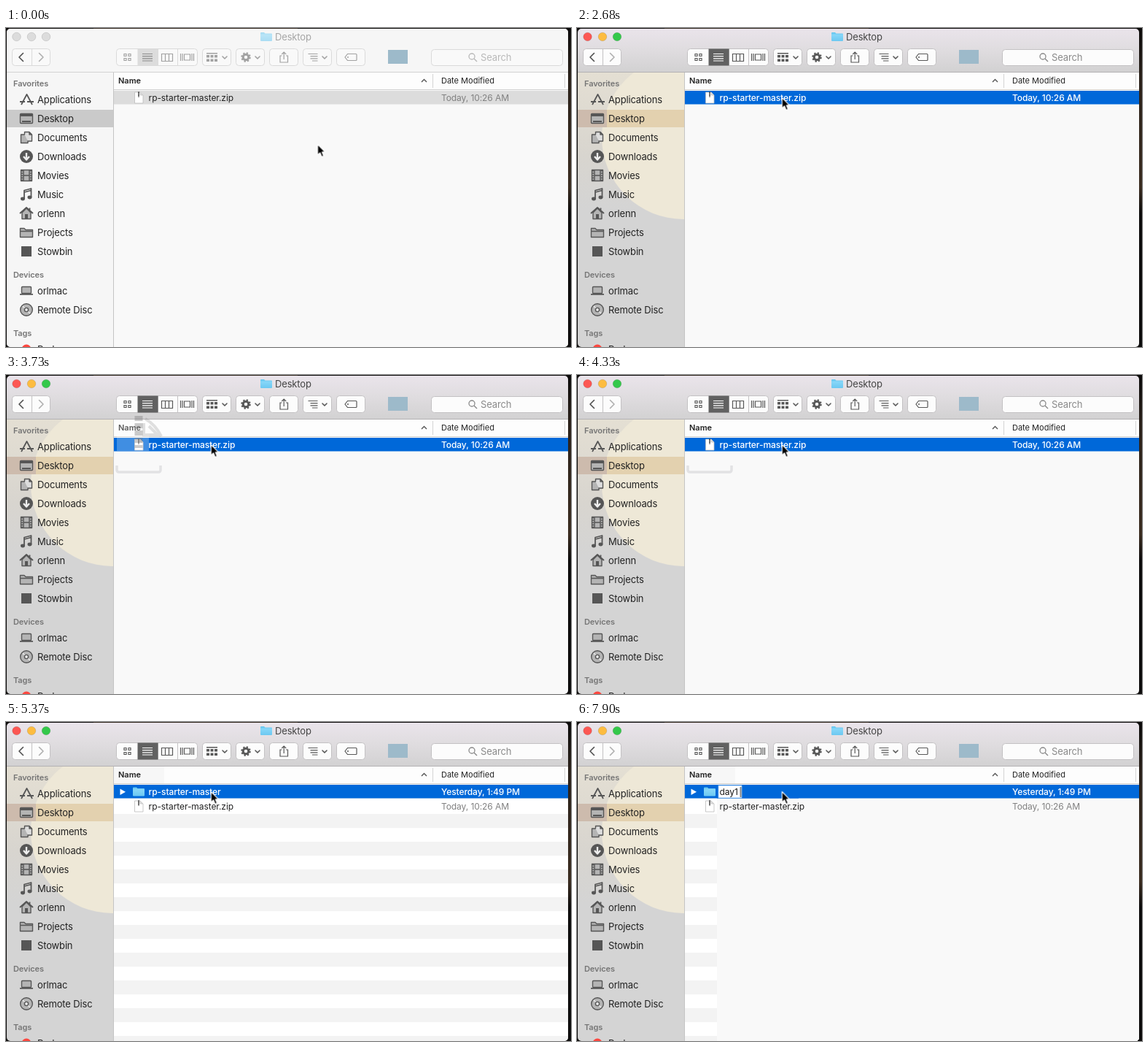
Animation, 775 px wide and 437 px high, one loop 8 s. Source, as an HTML page:

```html
<!DOCTYPE html>
<html lang="en">
<head>
<meta charset="utf-8">
<title>Renaming an unpacked folder</title>
<style>
html, body { margin: 0; width: 100%; height: 100%; overflow: hidden; background: #0d0c0b; }
svg { display: block; width: 775px; height: 437px; }
text { font: 400 13px Inter, "Open Sans", sans-serif; letter-spacing: -.15px; fill: #222; white-space: pre; }

/* Window themes, inherited by the <use> copies */
.live {
  --bar: url(#bar); --line: #b3b1b3; --side: url(#side); --tint: 1; --pick: #e3d1af; --pickLeft: #cdbbad;
  --ink: #585858; --btn: #fcfcfc; --edge: #c3c1c3; --on: #616161; --onInk: #fff; --title: #444; --hint: #8a8a8a;
  --red: #fc5753; --yellow: #fdbc40; --green: #34c84a; --fade: 1;
}
.idle {
  --bar: #f6f6f6; --line: #d2d2d2; --side: #f6f6f6; --tint: 0; --pick: #cacaca; --pickLeft: #cacaca;
  --ink: #a2a2a2; --btn: #f9f9f9; --edge: #dadada; --on: #dcdcdc; --onInk: #8c8c8c; --title: #a6a6a6; --hint: #b9b9b9;
  --red: #dcdcdc; --yellow: #dcdcdc; --green: #dcdcdc; --fade: .55;
}
/* Row themes */
.sel { --row: #0068d9; --name: #fff; --date: #fff; --arrow: #fff; --w: 500; }
.dim { --row: #dcdcdc; --name: #222; --date: #808080; --arrow: #777; --w: 400; }
.plain { --row: transparent; --name: #222; --date: #808080; --arrow: #777; --w: 400; }

.btn { fill: var(--btn); stroke: var(--edge); }
.ink { fill: none; stroke: var(--ink); stroke-width: 1.2; }
.inkFill { fill: var(--ink); }
.chev { fill: none; stroke: var(--ink); stroke-width: 1.6; stroke-linecap: round; stroke-linejoin: round; }
.side text.h { font-size: 11px; font-weight: 600; letter-spacing: -.1px; fill: #757575; }
.glyph { fill: none; stroke: #565656; stroke-width: 1.4; stroke-linejoin: round; }
.glyph .g { fill: #b4b4b4; }
.glyph .s { fill: #565656; stroke: none; }
.col { font-size: 11px; letter-spacing: 0; }
.row rect.bg { fill: var(--row); }
.row text, .edit text { font-size: 12px; letter-spacing: -.08px; }
.row .name { fill: var(--name); font-weight: var(--w); }
.row .date { fill: var(--date); font-weight: var(--w); }

/* Timing: every change is a hard cut */
.t { animation: 8s step-end infinite; opacity: 0; }
#idle { animation-name: idle; }
#ghost { animation-name: ghost; }
#tray { animation-name: tray; }
#list { animation-name: list; }
#folderOn { animation-name: folderOn; }
#zipOn { animation-name: zipOn; }
.flat { animation-name: edit; }
#picked { animation-name: picked; }
#typed { animation-name: typed; }
#field { animation: field 8s step-end infinite; }
#caret { animation: caret 8s step-end infinite; }
#typed .c { fill: transparent; animation: 8s step-end infinite; }
#typed .c2 { animation-name: c2; }
#typed .c3 { animation-name: c3; }
#typed .c4 { animation-name: c4; }
#arrow { animation: move 8s step-end infinite; }
#beam { animation-name: beam; }

@keyframes idle { 0% { opacity: 1 } 16.875% { opacity: 0 } 42.875% { opacity: 1 } 46.625% { opacity: 0 } }
@keyframes ghost { 0% { opacity: 0 } 46.625% { opacity: 1 } 48.5% { opacity: 0 } }
@keyframes tray { 0% { opacity: 0 } 46.625% { opacity: 1 } 56% { opacity: 0 } }
@keyframes list { 0% { opacity: 0 } 56%, 100% { opacity: 1 } }
@keyframes folderOn { 0% { opacity: 0 } 56% { opacity: 1 } 57.875% { opacity: 0 } 67.125%, 100% { opacity: 1 } }
@keyframes zipOn { 0% { opacity: 0 } 57.875% { opacity: 1 } 67.125% { opacity: 0 } }
@keyframes edit { 0% { opacity: 0 } 85.875%, 100% { opacity: 1 } }
@keyframes picked { 0% { opacity: 0 } 85.875% { opacity: 1 } 93.25% { opacity: 0 } }
@keyframes typed { 0% { opacity: 0 } 93.25%, 100% { opacity: 1 } }
@keyframes field { 0% { width: 105px } 93.25% { width: 14px } 95.125% { width: 20px } 96.875% { width: 26px } 98.75%, 100% { width: 32px } }
@keyframes caret { 0% { transform: translateX(204.5px) } 95.125% { transform: translateX(211.5px) } 96.875% { transform: translateX(218px) } 98.75%, 100% { transform: translateX(224.5px) } }
@keyframes c2 { 0% { fill: transparent } 95.125%, 100% { fill: #111 } }
@keyframes c3 { 0% { fill: transparent } 96.875%, 100% { fill: #111 } }
@keyframes c4 { 0% { fill: transparent } 98.75%, 100% { fill: #111 } }
@keyframes beam { 0% { opacity: 0 } 84% { opacity: 1 } 93.25% { opacity: 0 } }
@keyframes move {
  0% { transform: translate(427.5px, 159.5px); opacity: 1 }
  22.5% { transform: translate(399.5px, 145px); opacity: 1 }
  24.375% { transform: translate(342.5px, 111px); opacity: 1 }
  26.25% { transform: translate(333.5px, 110px); opacity: 1 }
  28.125% { transform: translate(325.5px, 109px); opacity: 1 }
  29.875% { transform: translate(303.5px, 98.5px); opacity: 1 }
  31.75% { transform: translate(284.5px, 95.5px); opacity: 1 }
  33.5% { transform: translate(281.3px, 95.5px); opacity: 1 }
  84% { transform: translate(281.3px, 95.5px); opacity: 0 }
  93.25%, 100% { transform: translate(281.3px, 95.5px); opacity: 1 }
}
</style>
</head>
<body>
<svg viewBox="0 0 775 437">
<defs>
  <linearGradient id="bar" x2="0" y2="1"><stop stop-color="#eae4eb"/><stop offset=".45" stop-color="#e0dde0"/><stop offset="1" stop-color="#d2d1d2"/></linearGradient>
  <linearGradient id="side" x2="0" y2="1"><stop stop-color="#e4dfd3"/><stop offset=".3" stop-color="#d8d5cf"/><stop offset=".5" stop-color="#d4d4d4"/></linearGradient>
  <linearGradient id="desk" x2="0" y2="1"><stop stop-color="#0b0a0a"/><stop offset=".15" stop-color="#2a211a"/><stop offset=".5" stop-color="#3a2c20"/><stop offset=".58" stop-color="#0d0c0c"/></linearGradient>
  <linearGradient id="folderFill" x2="0" y2="1"><stop stop-color="#5fc3ee"/><stop offset=".3" stop-color="#86d6f8"/><stop offset="1" stop-color="#6cc8f1"/></linearGradient>
  <clipPath id="frame"><rect x="1" y="1" width="770" height="436" rx="5"/></clipPath>
  <clipPath id="sideClip"><rect x="1" y="61" width="146" height="376"/></clipPath>
  <pattern id="stripes" y="126" width="775" height="38" patternUnits="userSpaceOnUse"><rect width="775" height="19.2" fill="#f3f3f3"/></pattern>

  <path id="folder" d="M0 1.5Q0 .5 1 .5H5L6.5 2H15Q16 2 16 3V11.5Q16 12.5 15 12.5H1Q0 12.5 0 11.5Z" fill="url(#folderFill)"/>
  <path id="down" class="chev" d="M-3-1.5 0 1.5 3-1.5"/>

  <g id="zip">
    <path d="M.5.5H8L12 4.5V15.5H.5Z" fill="#fff" stroke="#bbb" stroke-width=".8"/>
    <path d="M8 .5V4.5H12" fill="#ddd" stroke="#b5b5b5" stroke-width=".6"/>
    <path d="M6 0V7" stroke="#444" stroke-width="2" stroke-dasharray="1.6 .5"/>
  </g>

  <g id="zipRow" class="row">
    <rect class="bg" x="148" y="86" width="623" height="18.5"/>
    <use href="#zip" x="176" y="87.500"/>
    <text class="name" x="195.500" y="100">rp-starter-master.zip</text>
    <text class="date" x="597" y="100">Today, 10:26 AM</text>
  </g>
  <g id="folderRow" class="row">
    <rect class="bg" x="148" y="86" width="623" height="18.5"/>
    <path d="M156.500 91.500V100L164 95.700Z" style="fill:var(--arrow)"/>
    <use href="#folder" x="174" y="89"/>
    <text class="name" x="195.500" y="100">rp-starter-master</text>
    <text class="date" x="597" y="100">Yesterday, 1:49 PM</text>
  </g>

  <g id="toolbar">
    <rect x="1" y="1" width="770" height="60" style="fill:var(--bar)"/>
    <path d="M1 60.500H771" style="stroke:var(--line)"/>
    <g stroke="#000" stroke-opacity=".12">
      <circle cx="14.500" cy="12" r="5.800" style="fill:var(--red)"/>
      <circle cx="35" cy="12" r="5.800" style="fill:var(--yellow)"/>
      <circle cx="55" cy="12" r="5.800" style="fill:var(--green)"/>
    </g>
    <use href="#folder" x="349" y="5.500" style="opacity:var(--fade)"/>
    <text x="369" y="17" style="fill:var(--title)">Desktop</text>

    <g class="btn">
      <rect x="8.500" y="28.500" width="52" height="23" rx="4"/>
      <rect x="151.500" y="28.500" width="111" height="23" rx="4"/>
      <rect x="269.500" y="28.500" width="39" height="23" rx="4"/>
      <rect x="315.500" y="28.500" width="39" height="23" rx="4"/>
      <rect x="361.500" y="28.500" width="39" height="23" rx="4"/>
      <rect x="407.500" y="28.500" width="39" height="23" rx="4"/>
      <rect x="453.500" y="28.500" width="39" height="23" rx="4"/>
      <rect x="583.500" y="29.500" width="180" height="22" rx="4"/>
      <path d="M35.500 29V51M208.500 29V51M235.500 29V51"/>
    </g>
    <path class="chev" d="M23.500 34.500 18 40 23.500 45.500" style="stroke:#505050"/>
    <path class="chev" d="M45.500 34.500 51 40 45.500 45.500" style="stroke:#b0b0b0"/>
    <g class="ink">
      <path d="M162 35.500h3v3h-3zM168 35.500h3v3h-3zM162 41.500h3v3h-3zM168 41.500h3v3h-3z"/>
      <path d="M213.500 35.500h15v10h-15zM218.500 35.500v10M223.500 35.500v10"/>
      <path d="M244.500 36h8v8h-8zM239.500 35v10M242 35v10M255 35v10M257.500 35v10"/>
    </g>
    <rect x="180.500" y="28.500" width="28" height="23" style="fill:var(--on)"/>
    <path d="M187 35.500h14M187 38.700h14M187 41.900h14M187 45h14" style="stroke:var(--onInk)" stroke-width="1.200"/>
    <path class="inkFill" d="M275 34h15v1.500h-15zM275 37h4v3.500h-4zM280.500 37h4v3.500h-4zM286 37h4v3.500h-4zM275 42.500h4v3.500h-4zM280.500 42.500h4v3.500h-4zM286 42.500h4v3.500h-4z"/>
    <circle class="ink" cx="329" cy="40" r="3.800" style="stroke-width:3"/>
    <circle class="ink" cx="329" cy="40" r="5.600" style="stroke-width:2.4;stroke-dasharray:2.2 2.2"/>
    <path class="ink" d="M378.500 38H376V47H386.500V38H384M381.200 43V33M378.200 36 381.200 33 384.200 36"/>
    <path class="ink" d="M414.500 35.500h13M417.500 38.700h10M417.500 41.900h10M420 45h7.500"/>
    <path class="ink" d="M465 40 468.500 35.500H480Q481 35.500 481 36.500V43.500Q481 44.500 480 44.500H468.500Z"/>
    <circle class="inkFill" cx="469" cy="40" r="1"/>
    <use href="#down" x="300" y="40.500"/><use href="#down" x="345" y="40.500"/><use href="#down" x="437" y="40.500"/>
    <rect x="524" y="30" width="27" height="19" fill="#9dbaca"/>
    <circle cx="639" cy="39" r="4" fill="none" style="stroke:var(--hint)" stroke-width="1.300"/>
    <path d="M642 42 646 46" style="stroke:var(--hint)" stroke-width="1.500"/>
    <text x="651" y="45" style="fill:var(--hint)">Search</text>
  </g>

  <g id="sidebar" class="side" clip-path="url(#sideClip)">
    <rect x="1" y="61" width="147" height="376" style="fill:var(--side)"/>
    <circle cx="146" cy="150" r="112" fill="#eee8d7" style="opacity:var(--tint)"/>
    <rect x="1" y="112" width="147" height="24" style="fill:var(--pick)"/>
    <rect x="1" y="112" width="40" height="24" style="fill:var(--pickLeft)"/>
    <text class="h" x="10" y="80">Favorites</text>
    <text x="43" y="103">Applications</text>
    <text x="43" y="129">Desktop</text>
    <text x="43" y="155">Documents</text>
    <text x="43" y="181">Downloads</text>
    <text x="43" y="207">Movies</text>
    <text x="43" y="233">Music</text>
    <text x="43" y="259">orlenn</text>
    <text x="43" y="285">Projects</text>
    <text x="43" y="311">Stowbin</text>
    <text class="h" x="10" y="342">Devices</text>
    <text x="43" y="365">orlmac</text>
    <text x="43" y="391">Remote Disc</text>
    <text class="h" x="10" y="422">Tags</text>
    <text x="43" y="445">Red</text>
    <circle cx="28" cy="440" r="6.500" fill="#fc4840"/>
    <g class="glyph">
      <path d="M21 105 28.500 91 36 105M19 101H26M29 101H38" stroke-width="1.800"/>
      <g transform="translate(28 124)"><rect class="g" x="-8.500" y="-6.500" width="17" height="13" rx="1"/><path class="s" d="M-8-6H8V-3H-8zM-6 3H6V5H-6z"/></g>
      <g transform="translate(28 150)"><path class="g" d="M-7.500-4H-1L2-1V7.500H-7.500Z"/><path d="M-2.500-4V-7.500H4L7.500-4V5H2M4-7.500V-4H7.500" fill="#ddd"/></g>
      <g transform="translate(28 176)"><circle class="s" r="9"/><path d="M0-5V3M-4 0 0 4.500 4 0" stroke="#eee" stroke-width="2.400"/></g>
      <g transform="translate(28 202)"><rect class="g" x="-7.500" y="-7.500" width="15" height="15"/><path d="M-4-7.500V7.500M4-7.500V7.500M-4 0H4"/><path d="M-5.800-7V7M5.800-7V7" stroke-dasharray="1.600 1.600" stroke-width="2"/></g>
      <g transform="translate(28 228)"><path d="M-3 6V-5.500L6.500-8V4M-3-3 6.500-5.500" stroke-width="1.800"/><ellipse class="s" cx="-5" cy="6" rx="3" ry="2.400"/><ellipse class="s" cx="4.500" cy="4" rx="3" ry="2.400"/></g>
      <g transform="translate(28 254)"><path class="g" d="M-6-1V7.500H6V-1L0-7Z"/><path d="M-9 0 0-8 9 0M4.500-4V-7.500" stroke-width="1.800"/><path class="s" d="M-2 1H2V7.500H-2z"/></g>
      <path class="g" d="M19.500 274.500H25L27 276.500H36.500V286.500H19.500ZM19.500 278.500H36.500"/>
      <rect class="s" x="21" y="299" width="14" height="14"/>
      <g transform="translate(28 360)"><rect class="g" x="-6.500" y="-5.500" width="13" height="9" rx="1"/><path d="M-9 4.800H9" stroke-width="1.800"/></g>
      <g transform="translate(28 386)"><circle class="g" r="8.300"/><path d="M-5-5-2-2M2 2 5 5" stroke="#eee"/><circle r="2.600" fill="#e8e8e8"/></g>
    </g>
  </g>

  <g id="window" clip-path="url(#frame)">
    <rect x="148" y="61" width="623" height="376" fill="#f9f9f9"/>
    <rect x="148" y="61" width="623" height="23" fill="#fdfdfd"/>
    <path d="M148 84.500H771" stroke="#cfcfcf"/>
    <path d="M585.500 63V82M766.500 63V82" stroke="#d4d4d4"/>
    <text class="col" x="154" y="76" font-weight="600" style="font-weight:600">Name</text>
    <path d="M570 74 573.500 70.500 577 74" fill="none" stroke="#555" stroke-width="1.400"/>
    <text class="col" x="597" y="76">Date Modified</text>
    <use href="#toolbar"/>
    <use href="#sidebar"/>
    <path d="M147.500 61V437" stroke="#c4c4c4"/>
  </g>
</defs>

<rect width="775" height="437" fill="#0d0c0b"/>
<rect x="771" width="4" height="437" fill="url(#desk)"/>
<path d="M120 .500H400" stroke="#30261c"/>

<use href="#window" class="live"/>
<use href="#zipRow" class="sel"/>
<g id="idle" class="t">
  <use href="#window" class="idle"/>
  <use href="#zipRow" class="dim"/>
</g>

<!-- Fading icon of the opened archive -->
<g id="ghost" class="t">
  <path d="M152 62H196V104H152Z" fill="#fff" fill-opacity=".25"/>
  <path d="M182 56V100" stroke="#777" stroke-opacity=".38" stroke-width="11" stroke-dasharray="7 3"/>
  <path d="M191 60Q205 68 213 84M189 66V82H212M196 70 207 81" fill="none" stroke="#888" stroke-opacity=".25" stroke-width="4"/>
</g>
<path id="tray" class="t" d="M152 124V130Q152 133 155 133H209Q212 133 212 130V124" fill="none" stroke="#e2e2e4" stroke-width="3.500"/>

<g id="list" class="t" clip-path="url(#frame)">
  <path d="M148 61H217V84H148Z" fill="#000" fill-opacity=".025"/>
  <rect x="148" y="85" width="623" height="352" fill="#fff"/>
  <rect x="148" y="85" width="623" height="20" fill="#f3f3f3"/>
  <rect x="148" y="126" width="623" height="311" fill="url(#stripes)"/>
  <rect class="t flat" x="192" y="105" width="579" height="332" fill="#f9f9f9"/>
  <g id="folderOn" class="t">
    <use href="#folderRow" class="sel"/>
    <use href="#zipRow" class="plain" y="20"/>
  </g>
  <g id="zipOn" class="t">
    <use href="#folderRow" class="plain"/>
    <rect x="148" y="105" width="623" height="20" fill="#0068d9"/>
    <use href="#zipRow" class="sel" y="20"/>
  </g>
</g>

<g class="t flat edit">
  <rect x="192" y="86" width="112" height="18.500" fill="#0068d9"/>
  <rect id="field" x="194" y="87" width="105" height="17" fill="#fff" stroke="#8dbdf0" stroke-width=".8"/>
  <g id="picked" class="t">
    <rect x="196" y="88.500" width="99" height="14.500" fill="#b3d7fe"/>
    <text x="195.500" y="100">rp-starter-master</text>
  </g>
  <g id="typed" class="t">
    <text x="195.500" y="100">d<tspan class="c c2">a</tspan><tspan class="c c3">y</tspan><tspan class="c c4">1</tspan></text>
    <path id="caret" d="M0 89V103" stroke="#111"/>
  </g>
</g>

<g id="beam" class="t" fill="none">
  <path id="bar2" d="M279.500 90Q282.500 90 282.500 92V102Q282.500 104.500 279.500 104.500M285.500 90Q282.500 90 282.500 92M282.500 102Q282.500 104.500 285.500 104.500M280.500 98.500H284.500" stroke="#fff" stroke-opacity=".7" stroke-width="2.600"/>
  <use href="#bar2" style="display:none"/>
  <path d="M279.500 90Q282.500 90 282.500 92V102Q282.500 104.500 279.500 104.500M285.500 90Q282.500 90 282.500 92M282.500 102Q282.500 104.500 285.500 104.500M280.500 98.500H284.500" stroke="#111" stroke-width="1.200"/>
</g>
<path id="arrow" d="M0 0V14.300L3.300 11.300 5.600 16.800 8.200 15.700 5.900 10.400H10.200Z" fill="#000" stroke="#fff" stroke-width="1.100" stroke-linejoin="round"/>
</svg>
</body>
</html>
```
